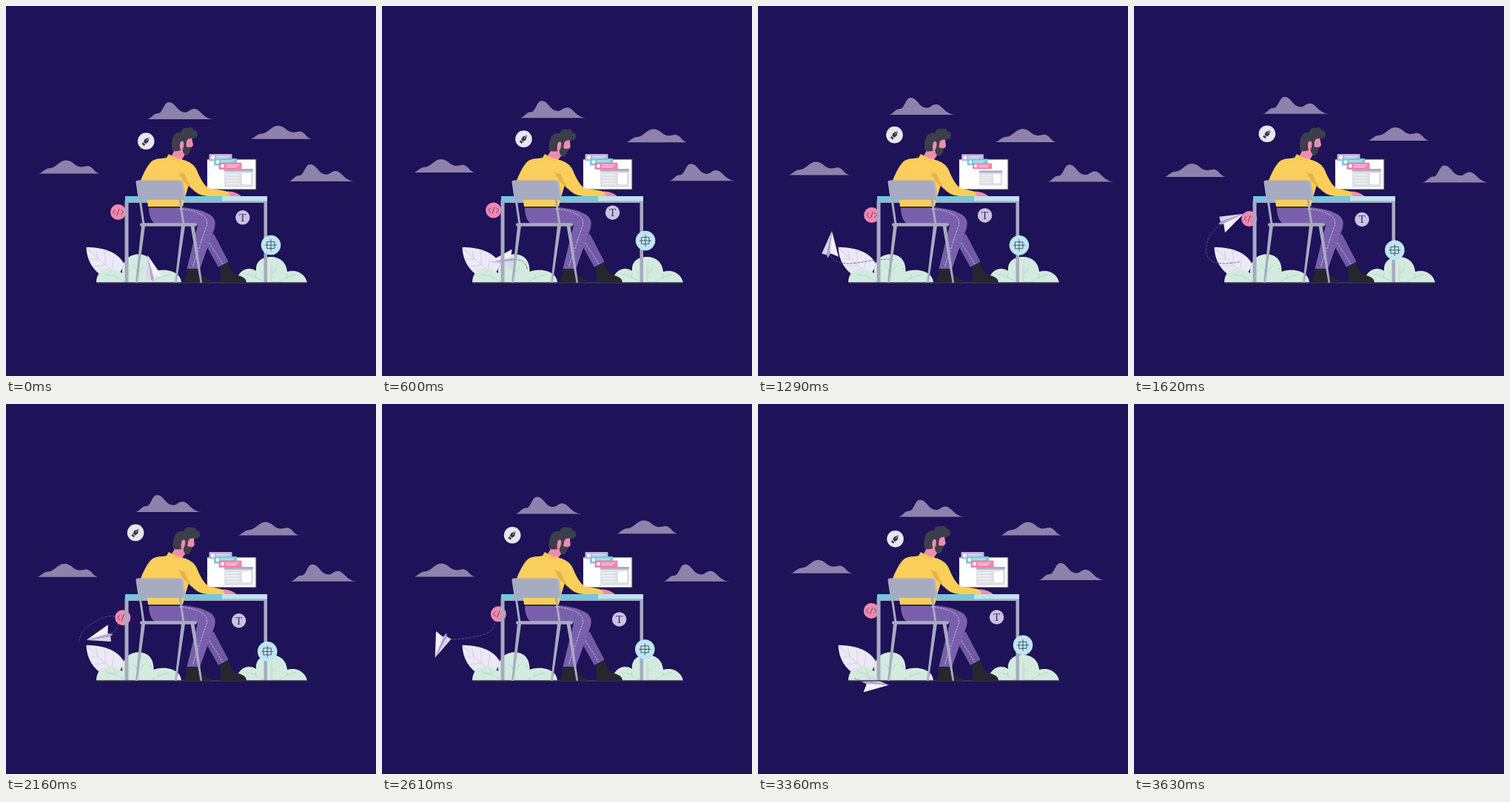
These frames come from a looping animation (500 by 500 pixels, 3.66 s). An HTML page:

```html
<!DOCTYPE html>
<html lang="en">
<head>
<meta charset="utf-8">
<title>Designer at a desk</title>
<style>
  html, body { margin: 0; width: 100%; height: 100%; overflow: hidden; background: #1e1259; }
  svg { display: block; width: 100%; height: 100%; }
  .cloud { fill: #8c82ab; }
  .metal { fill: #a7abc1; }
  .skin { fill: #ee8cae; }
  .hair { fill: #3c3e4b; }
  .shirt { fill: #f9ce5b; }
  .shoe { fill: #25272e; }
  .bush { fill: #d3ebdf; }
  .line { fill: none; stroke-width: .8; stroke-linecap: round; stroke-linejoin: round; }
  .ink { stroke: #34344c; }
  .vein { stroke: #a5d5bd; }
  .seam { stroke: #e4dcf4; stroke-dasharray: 2.5 1.5; stroke-linecap: butt; }
</style>
</head>
<body>
<svg viewBox="0 0 500 500">
  <defs>
    <path id="peak" d="M0 0C6-1 7-8 15-8C21-9 22-23 29-23C38-23 40-10 50-9.5C56-9 58-15 64-14C72-13 75-1 89 0Z"/>
    <path id="hill" d="M0 0C5-1 7-6 13-7C24-7 27-18 37-18C46-18 49-9 57-9C62-9 64-11 68-10C74-8 76-1 82 0Z"/>
    <g id="card">
      <rect width="31" height="9.5" rx="1"/>
      <circle cx="5" cy="4.7" r="2.4" fill="#fff"/>
      <path class="line" d="M10 3.5H27M10 6H24" stroke="#fff"/>
    </g>
  </defs>

  <g id="scene">
    <use id="cloudA" href="#peak" class="cloud"/>
    <use id="cloudB" href="#hill" class="cloud"/>
    <use id="cloudC" href="#hill" class="cloud"/>
    <use id="cloudD" href="#peak" class="cloud"/>

    <!-- plants -->
    <path d="M108.500 326C128 326 152 331 160 350L150 367H134C118 359 109 344 108.500 326Z" fill="#ece9f6"/>
    <path class="line" d="M109 326Q126 345 150 362M124 342L122 331M134 350V332M124 342H113M134 350L120 352M143 357L146 339" stroke="#cdc6e0"/>
    <path class="bush" d="M122 374C122 362 129 355 139 355Q149 355 157 361C156 345 166 335.500 179 335.500C193 335.500 200 345 199.500 359C217 353 237 360 237 374Z"/>
    <path class="line vein" d="M136 363Q150 364 160 373M147 366L148 361M180 345L179 373M179 360L187 352M179 358L171 351M198 373Q207 365 220 364M207 368L206 363"/>
    <path class="bush" d="M311 374C312 362 320 355 329 355Q334 355 338 358C337 345 346 339 358 339C371 339 379 347 380 359C394 355 405 363 407 374Z"/>
    <path class="line vein" d="M325 363Q338 364 348 373M337 367L338 361M359 350V373M359 362L367 354M370 373Q378 365 392 363M380 367V362M359 373H370"/>

    <!-- paper plane -->
    <path id="trail" class="line" stroke="#655d8a"/>
    <g id="plane">
      <path d="M19-1L-13-10L-14-3Z" fill="#dcd5ee"/>
      <path d="M19-1L-14-3L-18-1L-10 2Z" fill="#b3a9d0"/>
      <path d="M19-1L-11 1L-14 13Z" fill="#f3f0fa"/>
    </g>

    <g id="code">
      <circle r="10.5" fill="#f088b0"/>
      <path class="line ink" d="M-4-3L-7 0L-4 3M4-3L7 0L4 3M1.500-4L-1.500 4"/>
    </g>

    <!-- screen -->
    <path d="M271.500 206.500H339V249H271.500Z" fill="#30314a"/>
    <path d="M272 207.500H337.500V247.500H272Z" fill="#fff"/>
    <g id="page">
      <path d="M295 220H334V245H295Z" fill="#dfdfe7"/>
      <path d="M295 220H334V223.500H295Z" fill="#abaec3"/>
      <path d="M319 226H331V241H319Z" fill="#fff"/>
      <path class="line" d="M298 228H315M298 232H315M298 236H315M298 240H315" stroke="#fff"/>
    </g>
    <g id="card0"><use href="#card" x="274.500" y="200" fill="#c4b0e0"/></g>
    <g id="card1"><use href="#card" x="281" y="206" fill="#6fcfe0"/></g>
    <g id="card2"><use href="#card" x="287.500" y="211.500" fill="#f283ad"/></g>

    <!-- desk -->
    <path class="metal" d="M160.500 263H353V266H165.500V374H160.500ZM348.500 264H353V374H348.500Z"/>
    <path d="M161 257H292V263.500H161Z" fill="#73c8df"/>
    <path d="M292 257H353V263.500H292Z" fill="#bce4f1"/>
    <path d="M122 374H407" stroke="#3d3d4f" stroke-width="1.300"/>

    <!-- legs -->
    <path class="shoe" d="M290 352L300 346Q304 362 317 365Q325 368 325 374H289Z"/>
    <path d="M265 314L281 308L300.500 345.500L287 353Z" fill="#705aa3"/>
    <path class="shoe" d="M241 374L245 354H261Q263 367 277 371V374Z"/>
    <path d="M193 272H239Q262 274 276 282Q285 288 282 300L262 355H244.500L259 296H205Q193 292 193 272Z" fill="#7960ac"/>
    <path class="line seam" d="M234 274Q258 276 268 285Q274 290 270 300L252 353M275 320L293 349"/>

    <!-- head -->
    <g id="head">
      <path class="skin" d="M221 208L228 194L234 181L242 178H251L253 188L249 193L241 202L237 209Z"/>
      <path class="hair" d="M225 196Q222 184 226 176Q230 170 237 171Q238 163 246 165Q251 162 254 168Q260 168 259 175Q257 180 250 179Q245 179 243.500 184L241 186Q239 180 235.500 184Q234 189 236 195Q230 197 225 196Z"/>
      <path class="hair" d="M240 182L244 182L243.500 190Q247 192 250 190Q250 198 245 202Q239 201 238.500 194Q241 190 240 182Z"/>
    </g>

    <!-- torso and arm -->
    <path class="shirt" d="M220 200Q229 206 237 207L246 212L252 225L241 262L239 271H192L190 258Q180 250 181 238Q190 215 198 209Q203 206 211 206L217 205Z"/>
    <path class="line" d="M219 203Q227 209 236 209" stroke="#e2b440"/>
    <path d="M233 225L248 228L252 248L241 238Z" fill="#e3b546"/>
    <path id="hand" class="skin" d="M299 250.500Q310 250 318 257H299Z"/>
    <path id="arm" class="shirt"/>
    <path d="M193 271H237V273H193Z" fill="#30303c"/>

    <!-- chair -->
    <path d="M181 261L186 295M235 261L240 295" stroke="#a7abc1" stroke-width="3"/>
    <path class="metal" d="M183 297H188L177.500 374H175ZM237 297H242L230.500 374H228ZM249.500 297H254.500L265 374H262.500Z"/>
    <rect class="metal" x="181" y="293.300" width="77" height="4.400" rx="2.200"/>
    <path class="metal" d="M178.500 235.500H236Q239 235.500 239.500 238.500L242.500 258.500Q243 262 240 262H182Q179 262 178.500 259L175.500 238.500Q175.500 235.500 178.500 235.500Z"/>
    <path class="line" d="M236 236Q238 236.500 238.500 239L241 260" stroke="#c9ccdc"/>

    <!-- floating tools -->
    <g id="pen">
      <circle r="11.300" fill="#e8e6ee"/>
      <g transform="rotate(40)">
        <path d="M0-7L3-1L2 3H-2L-3-1ZM-2 4H2V6.500H-2Z" fill="#31324a"/>
        <path class="line" d="M0-6V-1" stroke="#e8e6ee"/>
      </g>
    </g>
    <g id="type">
      <circle r="9.700" fill="#cdc1e4"/>
      <text y="5" text-anchor="middle" font-family="'Liberation Serif', serif" font-size="15" fill="#34344c">T</text>
    </g>
    <g id="grid">
      <circle r="13.300" fill="#bde6f2"/>
      <path class="line ink" d="M-5-4.500H5V4.500H-5ZM0-7.500V7.500M-7.500 0H7.500"/>
    </g>
  </g>
</svg>
<script>
const LOOP = 3660, STEP = 30, TAU = 2 * Math.PI;
const $ = id => document.getElementById(id);
const move = (id, x, y) => $(id).setAttribute('transform', `translate(${x} ${y})`);

// One swing per loop around a centre, at its highest value at angle `peak`;
// `beat` adds a faster swing of twice the rate
const swing = (mid, size, peak, beat = 0) => a =>
  mid + size * Math.cos(a - peak * Math.PI / 180) + beat * Math.cos(2 * a);

const floaters = {
  cloudA: [swing(182.5, 8.6, 0), swing(149.3, 3.8, 0)],
  cloudB: [swing(322.6, 9, 25), swing(180, 5, 92)],
  cloudC: [swing(42.9, 1.6, -30), swing(229.5, 4.5, 230)],
  cloudD: [swing(385.3, 6.5, 120), swing(238.1, 1.9, 235)],
  pen: [swing(183.3, 8.4, 45), swing(177.7, 5, -8)],
  code: [swing(154.2, 3.7, 225), swing(281.9, 6, 205, 2)],
  type: [swing(315, 8.4, -55), swing(286.5, 6.4, 245, 2)],
  grid: [swing(355.2, 2.9, -15), swing(326, 8, 232, 2)]
};

// Flight of the paper plane: the time at which it completes each leg
const legs = [
  [600, 'C194 342 182 341 163 343'],
  [1290, 'C143 345 126 350 112 347S96 335 98 323'],
  [1620, 'C100 306 114 296 131 289'],
  [2160, 'C145 283 155 288 152 298S142 311 127 314'],
  [3060, 'C115 317 104 318 92 318S74 328 80 340S94 355 108 361'],
  [LOOP, 'C130 370 145 379 168 379S196 370 196 355']
];
const trail = $('trail');
let route = 'M196 355';
const stops = [[0, 0]];
for (const [time, leg] of legs) {
  trail.setAttribute('d', route += leg);
  stops.push([time, trail.getTotalLength()]);
}

function flown(t) {
  const i = stops.findIndex(s => s[0] > t);
  const [a, p] = stops[i - 1], [b, q] = stops[i];
  return p + (q - p) * (t - a) / (b - a);
}

function drawPlane(t) {
  const s = flown(t), at = d => trail.getPointAtLength(d);
  const p = at(s), a = at(s - 2), b = at(s + 2);
  const angle = Math.atan2(b.y - a.y, b.x - a.x) * 180 / Math.PI;
  $('plane').setAttribute('transform', `translate(${p.x} ${p.y}) rotate(${angle})`);

  const tail = Math.max(0, s - 110 * Math.sin(Math.PI * t / LOOP));
  const from = Math.floor(tail / 5) * 5;
  const dashes = [0, from];
  for (let d = from; d < s - 8; d += 5) dashes.push(3, 2);
  dashes.push(0, 9999);
  trail.style.strokeDasharray = dashes.join(' ');
}

function ease(t, from, to) {
  const u = Math.min(1, Math.max(0, (t - from) / (to - from)));
  return u * u * (3 - 2 * u);
}

function shrink(id, cx, cy, k) {
  $(id).setAttribute('transform', `translate(${cx} ${cy}) scale(${k}) translate(${-cx} ${-cy})`);
}

function draw(t) {
  $('scene').style.display = t < LOOP - STEP ? '' : 'none';
  for (const id in floaters) {
    const [x, y] = floaters[id];
    move(id, x(t / LOOP * TAU), y(t / LOOP * TAU));
  }

  const nod = 6 * Math.min(1, 2 * Math.sin(Math.PI * t / 1580) ** 2);
  $('head').setAttribute('transform', `rotate(${nod} 228 206)`);

  const reach = 6.5 * (ease(t, 2300, 2900) - ease(t, 700, 1200)), cuff = 302 + reach;
  move('hand', reach, 0);
  $('arm').setAttribute('d', `M234 207Q251 209 257 220Q265 240 273 246L${cuff - 8} 249.500Q${cuff} 250 ${cuff} 257H272Q258 256 250 245Q240 226 234 207Z`);

  const pulse = ease(t, 990, 1290) - ease(t, 1290, 1590);
  shrink('page', 314.5, 232.5, 1 - .2 * pulse);
  for (let i = 0; i < 3; i++) {
    shrink('card' + i, 290 + 6.5 * i, 205 + 6 * i, 1 - (.04 + .06 * i) * pulse);
  }
  drawPlane(t);
}

const start = performance.now();
function tick() {
  const t = (performance.now() - start) % LOOP;
  draw(Math.floor(t / STEP) * STEP);
  requestAnimationFrame(tick);
}
tick();
</script>
</body>
</html>
```
